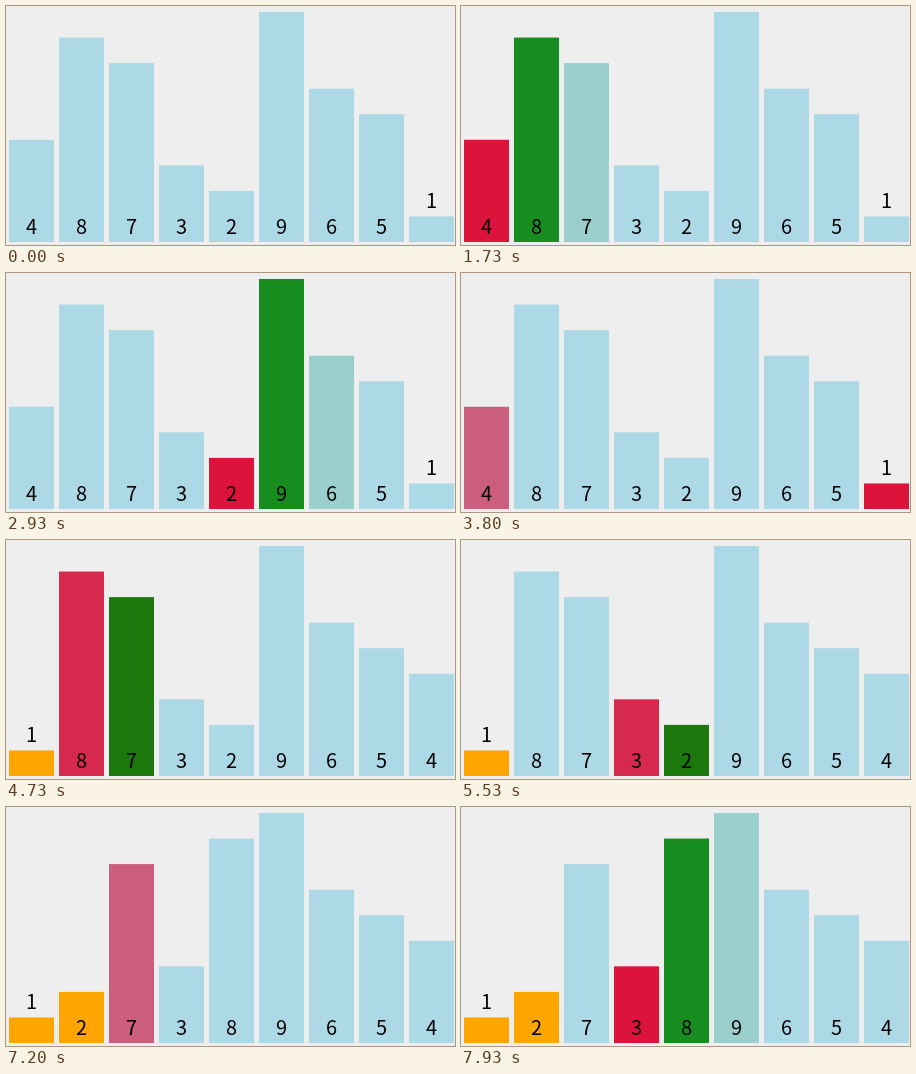
Recreate the animation shown at these times as an HTML page with a canvas. Size 449 by 239 pixels, loop 8 s.

```html
<!DOCTYPE html>
<html lang="en">
<head>
<meta charset="utf-8">
<title>Selection sort</title>
<style>
html, body { margin: 0; width: 100%; height: 100%; overflow: hidden; background: #eee; }
canvas { display: block; }
</style>
</head>
<body>
<canvas id="stage" width="449" height="239"></canvas>
<script>
const ctx = document.getElementById('stage').getContext('2d');
const LOOP = 8000, START = 1306, STEP = 200, FADE = 260, TICK = 1000 / 15;
const PLAIN = [173, 216, 230], SMALLEST = [220, 20, 60], CURRENT = [0, 128, 0], SORTED = [255, 165, 0];
const BASE = 236, UNIT = 230 / 9, WIDTH = 45;
const slotX = i => [3 + 50 * i];

const bars = [4, 8, 7, 3, 2, 9, 6, 5, 1].map((value, i) => ({
  value,
  fill: [{ at: 0, to: PLAIN }],
  x: [{ at: 0, to: slotX(i) }]
}));

// Run the sort once and note when each bar changes colour or place.
function plan() {
  const list = bars.slice();
  let now = START;
  const wait = () => { now += STEP; };
  const paint = (bar, to) => bar.fill.push({ at: now, to });
  const place = i => list[i].x.push({ at: now, to: slotX(i) });

  for (let i = 0; i < list.length && now < LOOP; i++) {
    let min = i;
    const release = j => { if (j !== min) paint(list[j], PLAIN); };
    paint(list[i], SMALLEST);
    wait();
    for (let j = i + 1; j < list.length; j++) {
      if (j > i + 1) release(j - 1);
      paint(list[j], CURRENT);
      wait();
      if (list[j].value < list[min].value) {
        paint(list[min], PLAIN);
        paint(list[j], SMALLEST);
        min = j;
        wait();
      }
    }
    release(list.length - 1);
    paint(list[i], SMALLEST);
    wait();
    [list[i], list[min]] = [list[min], list[i]];
    place(i);
    place(min);
    wait();
    paint(list[min], PLAIN);
    paint(list[i], SORTED);
    wait();
  }
}

// cubic-bezier(.25, .1, .25, 1)
function ease(p) {
  if (p >= 1) return 1;
  const curve = (s, a, b) => 3 * (1 - s) * (1 - s) * s * a + 3 * (1 - s) * s * s * b + s * s * s;
  let lo = 0, hi = 1;
  for (let n = 0; n < 24; n++) {
    const mid = (lo + hi) / 2;
    if (curve(mid, 0.25, 0.25) < p) lo = mid; else hi = mid;
  }
  return curve(lo, 0.1, 1);
}

// A new change starts from wherever the previous one had got to.
function valueAt(track, time) {
  let value = track[0].to;
  for (let n = 1; n < track.length && track[n].at < time; n++) {
    const end = n + 1 < track.length ? Math.min(time, track[n + 1].at) : time;
    const k = ease((end - track[n].at) / FADE);
    value = value.map((v, c) => v + (track[n].to[c] - v) * k);
  }
  return value;
}

function draw(time) {
  ctx.fillStyle = '#eee';
  ctx.fillRect(0, 0, 449, 239);
  for (const bar of bars) {
    const h = bar.value * UNIT;
    ctx.fillStyle = `rgb(${valueAt(bar.fill, time).map(Math.round).join(',')})`;
    ctx.fillRect(valueAt(bar.x, time)[0], BASE - h, WIDTH, h);
  }
  ctx.fillStyle = '#000';
  ctx.font = '20px "Noto Sans CJK SC", "Noto Sans CJK JP", "Noto Sans CJK", "Open Sans", sans-serif';
  ctx.textAlign = 'center';
  for (const bar of bars) {
    ctx.fillText(bar.value, valueAt(bar.x, time)[0] + WIDTH / 2, bar.value > 1 ? 228 : 202);
  }
}

const begin = performance.now();
function frame() {
  const time = (performance.now() - begin) % LOOP;
  draw(Math.floor((time + 4) / TICK) * TICK);
  requestAnimationFrame(frame);
}

plan();
frame();
</script>
</body>
</html>
```
